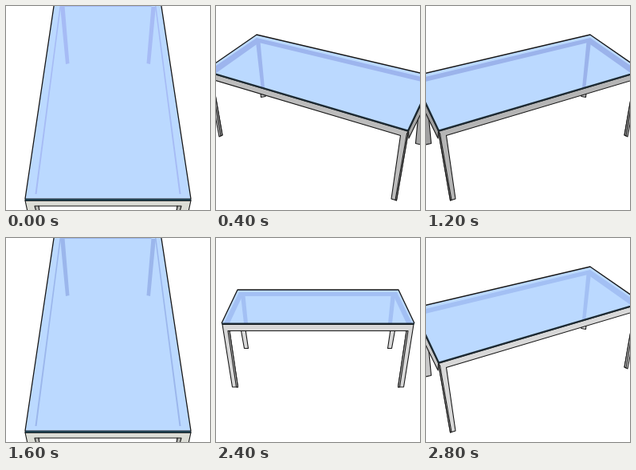
Write an HTML page that moves like this. It is 256 px wide and 256 px high and loops after 3200 ms.

```html
<!DOCTYPE html>
<html lang="en">
<head>
<meta charset="utf-8">
<title>Turning glass table</title>
<style>
  html, body { margin: 0; width: 100%; height: 100%; overflow: hidden; background: #fff; }
  svg { display: block; width: 100vw; height: 100vh; }
  .view {
    visibility: hidden;
    animation: turn 3200ms step-end infinite;
    animation-delay: calc(var(--i) * 400ms - 3200ms);
  }
  @keyframes turn {
    0% { visibility: visible; }
    12.5%, 100% { visibility: hidden; }
  }
  .glass { fill: #bbd9ff; }
  .beam { fill: var(--beam); }
  .front { fill: var(--front); }
  .side { fill: var(--side); }
  .front, .side, .edge { stroke: #161616; stroke-width: 1.1; stroke-linejoin: round; }
  .edge { fill: none; stroke-width: 1.3; }
  .rim { fill: #245064; stroke: #0c0c0c; stroke-width: .8; }
  .lip { fill: none; stroke: #1c2a33; stroke-width: 2; stroke-linejoin: round; }
</style>
</head>
<body>
<svg viewBox="0 0 256 256" preserveAspectRatio="none">
  <defs>
    <g id="end">
      <path class="front" d="M24 244H232L229 258H214L215 251H41L42 258H27Z"/>
      <path class="side" d="M36 251H41L42 258H38ZM215 251H220L218 258H214Z"/>
      <path class="glass" d="M24 242L60.500-3H194.500L232 242Z"/>
      <path class="beam" d="M36.500 236L67.500 0H69L38.500 236ZM219.500 236L188.500 0H187L217.500 236Z"/>
      <path class="beam" d="M68 0H73.500L79.500 72L75 73ZM188 0H182.500L176.500 72L181 73ZM68 0H188V1H68Z"/>
      <path class="edge" d="M24 242L60.500-3M194.500-3L232 242"/>
      <path class="rim" d="M24 242H232V244.500H24Z"/>
    </g>

    <g id="corner">
      <path class="front" d="M-10 88L-5 88L8 162L4 164Z"/>
      <path class="side" d="M-5 88L8 162L6 163L-7 88Z"/>
      <path class="front" d="M55 100L61 100L62 113.500L56.500 114.500Z"/>
      <path class="side" d="M254 135L262 118V175L250.500 172.500Z"/>
      <path class="side" d="M241.500 157L262 114V125L242 166Z"/>
      <path class="front" d="M-14 82L241.500 157.500L226.500 244L220 242L231.500 162.500L-14 89.500Z"/>
      <path class="side" d="M241.500 157.500L226.500 244L225 243.500L239.500 160Z"/>
      <path class="glass" d="M51 36L273 88L241 156L-14 81Z"/>
      <path class="beam" d="M51 40L262 90V96L54 46L-4 87L-10 82Z"/>
      <path class="beam" d="M50 45L55.500 45L61 103L56.500 101.500Z"/>
      <path class="edge" d="M-14 81L51 36L273 88"/>
      <path class="lip" d="M-14 81.500L241 156.500L273 88.500"/>
    </g>

    <g id="long">
      <path class="front" d="M30 108H36L40.500 138.500H35.500ZM226 108H220L215.500 138.500H220.500Z"/>
      <path class="front" d="M8 108.500H248L235.500 187H228.500L239 116.500H17L27.500 187H20.500Z"/>
      <path class="side" d="M15 116.500H17L27.500 187H25.500ZM241 116.500H239L228.500 187H230.500Z"/>
      <path class="glass" d="M27 65H229L249 107H7Z"/>
      <path class="beam" d="M29 68H227L246 107H239L223 73H33L17 107H10Z"/>
      <path class="beam" d="M31 72H36.500L40 107H35ZM225 72H219.500L216 107H221Z"/>
      <path class="edge" d="M7 107L27 65H229L249 107"/>
      <path class="lip" d="M7 107.500H249"/>
    </g>

    <g id="mirrored">
      <use href="#corner" transform="translate(257) scale(-1 1)"/>
    </g>
  </defs>

  <g style="--beam:#a6bbf5;--front:#dcddd6;--side:#b8b9b4">
    <use class="view" href="#end" style="--i:0"/>
  </g>
  <g style="--beam:#9db5ee;--front:#bcbcbc;--side:#a6a6a6">
    <use class="view" href="#corner" style="--i:1"/>
  </g>
  <g style="--beam:#9bb3eb;--front:#b5b5b5;--side:#a0a0a0">
    <use class="view" href="#long" style="--i:2"/>
    <use class="view" href="#mirrored" style="--i:3"/>
  </g>
  <g style="--beam:#9bb6ec;--front:#dcddd6;--side:#b8b9b4">
    <use class="view" href="#end" style="--i:4"/>
  </g>
  <g style="--beam:#a3c0f4;--front:#d8d8d8;--side:#c8c8c8">
    <use class="view" href="#corner" style="--i:5"/>
    <use class="view" href="#long" style="--i:6"/>
    <use class="view" href="#mirrored" style="--i:7"/>
  </g>
</svg>
</body>
</html>
```
